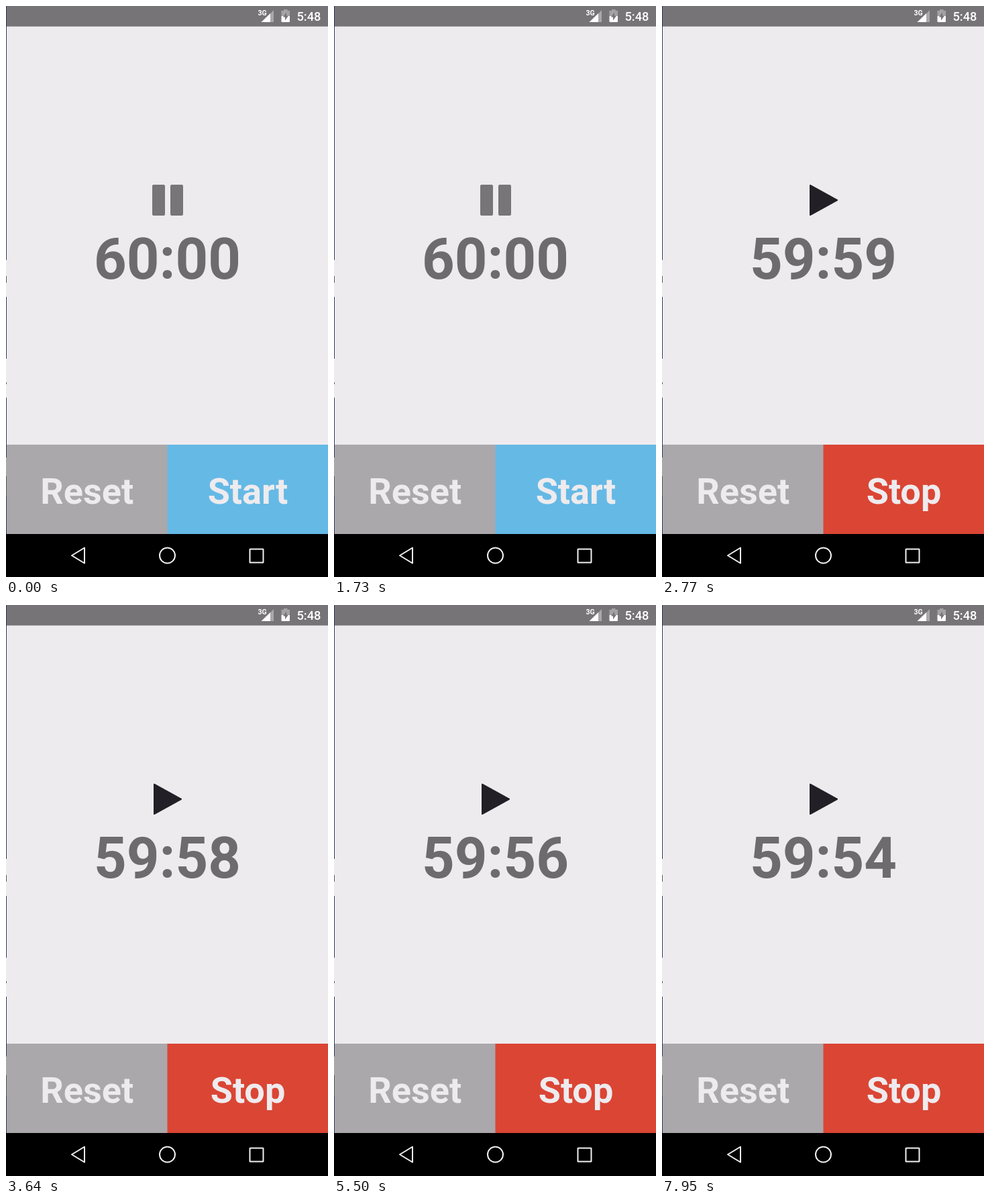
These frames come from a looping animation (480 by 850 pixels, 8 s). An HTML page:

```html
<!DOCTYPE html>
<html lang="en">
<head>
<meta charset="utf-8">
<title>Countdown timer</title>
<style>
  html, body { margin: 0; width: 100%; height: 100%; overflow: hidden; background: #eeebee; }
  svg { display: block; width: 480px; height: 850px; }
  text { font-family: Roboto, "Noto Sans", sans-serif; font-weight: 700; text-anchor: middle; }
  .label { font-size: 54px; fill: #eeebee; }
</style>
</head>
<body>
<svg viewBox="0 0 480 850">
  <rect width="480" height="850" fill="#eeebee"/>

  <!-- status bar -->
  <rect width="480" height="30.5" fill="#777477"/>
  <text x="382" y="14" font-size="10.5" textLength="auto" fill="#fff">3G</text>
  <path d="M394 11.5L399 6V24H394Z" fill="#aaa8aa"/>
  <path d="M380.5 24L394 11V24Z" fill="#fff"/>
  <path d="M414 5h5.500v2h3.500v8h-12.500v-8h3.500z" fill="#a5a2a5"/>
  <path d="M410.500 15h12.500v8q0 1-1 1h-10.500q-1 0-1-1z" fill="#fff"/>
  <path d="M418 9.500l-5 7h3v5l5-7h-3z" fill="#777477"/>
  <text x="451.500" y="22" font-size="18.300" style="font-weight:500" fill="#fff">5:48</text>

  <!-- timer -->
  <g id="pause" fill="#777578">
    <rect x="218" y="266" width="19" height="46" rx="2"/>
    <rect x="245" y="266" width="19" height="46" rx="2"/>
  </g>
  <path id="play" d="M221 267L261 289L221 311Z" fill="#222026" stroke="#222026" stroke-width="2" stroke-linejoin="round"/>
  <text id="time" x="240.500" y="406" font-size="85" fill="#6d6b6e">60:00</text>

  <!-- buttons -->
  <rect y="653" width="241" height="133" fill="#aba8ab"/>
  <rect id="button" x="240.500" y="653" width="239.500" height="133"/>
  <text class="label" x="120.800" y="741">Reset</text>
  <text id="action" class="label" x="360.500" y="741">Start</text>

  <!-- navigation bar -->
  <rect y="786" width="480" height="64" fill="#000"/>
  <g fill="none" stroke="#f2f2f2" stroke-width="2">
    <path d="M98 818L117 806.500V829.500Z" stroke-linejoin="round"/>
    <circle cx="240.500" cy="818" r="11.500"/>
    <rect x="363.500" y="808.500" width="20" height="20" rx="0.500"/>
  </g>

  <!-- screen edge -->
  <path d="M0.500 0V378M0.500 433V525M0.500 583V672M0.500 730V786" stroke="#2c3c58"/>
  <path d="M0.500 402v10M0.500 560v3M0.500 700v30" stroke="#555860"/>
</svg>
<script>
  const LOOP = 8000;
  const PRESS = 2200, START = 2280, RELEASE = 2410;
  const FIRST_TICK = 2360, TICK = 992;
  const el = id => document.getElementById(id);
  const [pause, play, time, button, action] =
    ["pause", "play", "time", "button", "action"].map(el);
  const pad = n => String(n).padStart(2, "0");

  function draw(t) {
    const running = t >= START;
    const pressed = t >= PRESS && t < RELEASE;
    const elapsed = t < FIRST_TICK ? 0 : 1 + Math.floor((t - FIRST_TICK) / TICK);
    const left = 3600 - elapsed;

    time.textContent = pad(Math.floor(left / 60)) + ":" + pad(left % 60);
    pause.style.display = running ? "none" : "";
    play.style.display = running ? "" : "none";
    action.textContent = running ? "Stop" : "Start";
    action.style.fill = pressed ? "#bebcbe" : "#eeebee";
    button.setAttribute("fill", running
      ? (pressed ? "#ae3429" : "#db4534")
      : (pressed ? "#5092b5" : "#65b9e5"));
  }

  const begin = performance.now();
  function frame() {
    draw((performance.now() - begin) % LOOP);
    requestAnimationFrame(frame);
  }
  draw(0);
  requestAnimationFrame(frame);
</script>
</body>
</html>
```
